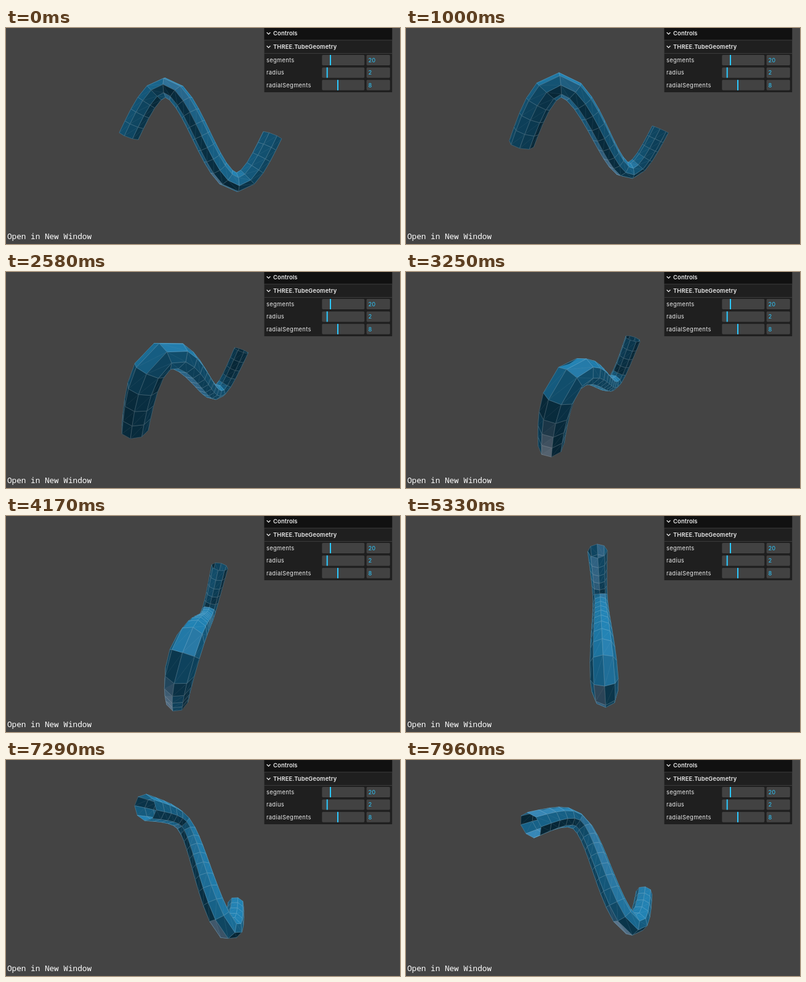
An HTML page with a canvas that plays this animation: 640x353 px, repeating every 8000 ms.

```html
<!DOCTYPE html>
<html lang="en">
<head>
<meta charset="utf-8">
<title>Tube geometry</title>
<style>
  html, body { margin: 0; width: 100%; height: 100%; overflow: hidden; background: #444; }
  canvas, svg { position: absolute; left: 0; top: 0; width: 640px; height: 353px; }
  text { font-family: Inter, Roboto, sans-serif; font-size: 9.35px; fill: #ebebeb; }
  .label { letter-spacing: .3px; }
  .title { font-weight: 600; letter-spacing: .16px; }
  .value { fill: #2cc9ff; }
  .link { font-family: "Noto Sans Mono", "DejaVu Sans Mono", monospace; font-size: 12.7px; fill: #fff; }
  .widget { fill: #424242; }
  .fill { fill: #2cc9ff; }
  .chevron { fill: none; stroke: #ebebeb; stroke-width: 1.3; }
</style>
</head>
<body>
<canvas id="scene" width="640" height="353"></canvas>
<svg id="panel" viewBox="0 0 640 353">
  <rect x="419.6" y="0" width="207.6" height="105" fill="#1f1f1f"/>
  <rect x="419.6" y="0" width="207.6" height="19.4" fill="#111"/>
  <path d="M419.6 19.9h207.6M419.6 41.5h207.6" stroke="#424242" stroke-width=".85"/>
  <path class="chevron" d="M423.6 7.2l2.9 2.9 2.9-2.9M423.6 29.2l2.9 2.9 2.9-2.9"/>
  <text class="title" x="434" y="11.9">Controls</text>
  <text class="title" x="434" y="34.1">THREE.TubeGeometry</text>
  <text class="link" x="2" y="345">Open in New Window</text>
</svg>
<script>
const SEGMENTS = 20, RADIUS = 2, SIDES = 8;
const CENTER_X = 317.5, CENTER_Y = 175.8, FOCAL = 231.6, CAMERA_Z = 30;
const LOOP = 8000, STEP = 1000 / 24, SPIN = 0.3, START_ANGLE = 0.025;

const sub = (a, b) => a.map((v, i) => v - b[i]);
const add = (a, b) => a.map((v, i) => v + b[i]);
const dot = (a, b) => a[0] * b[0] + a[1] * b[1] + a[2] * b[2];
const cross = (a, b) => [
  a[1] * b[2] - a[2] * b[1],
  a[2] * b[0] - a[0] * b[2],
  a[0] * b[1] - a[1] * b[0]
];
const unit = a => {
  const length = Math.hypot(...a) || 1;
  return a.map(v => v / length);
};

// Control panel rows: label, value, slider position
const panel = document.getElementById('panel');
[['segments', 20, 526], ['radius', 2, 520.7], ['radialSegments', 8, 538]].forEach(([label, value, x], row) => {
  const y = 44 + row * 20.4;
  panel.insertAdjacentHTML('beforeend', `
    <text class="label" x="423" y="${y + 11.9}">${label}</text>
    <rect class="widget" x="513.3" y="${y}" width="69" height="17" rx="1.7"/>
    <rect class="fill" x="${x}" y="${y}" width="2" height="17"/>
    <rect class="widget" x="585.6" y="${y}" width="38.2" height="17" rx="1.7"/>
    <text class="value" x="588.6" y="${y + 11.9}">${value}</text>`);
});

// Sine curve, sampled at equal arc lengths
const curve = t => [30 * t - 15, 10 * Math.sin(2 * Math.PI * t), 0];
const DIVISIONS = 200;
const lengths = [0];
for (let i = 1; i <= DIVISIONS; i++) {
  const piece = sub(curve(i / DIVISIONS), curve((i - 1) / DIVISIONS));
  lengths.push(lengths[i - 1] + Math.hypot(...piece));
}
function atLength(u) {
  const goal = u * lengths[DIVISIONS];
  let i = 0;
  while (i < DIVISIONS - 1 && lengths[i + 1] < goal) i++;
  return (i + (goal - lengths[i]) / (lengths[i + 1] - lengths[i])) / DIVISIONS;
}

const vertices = [];
for (let j = 0; j <= SEGMENTS; j++) {
  const t = atLength(j / SEGMENTS);
  const [x, y] = curve(t);
  const [tx, ty] = unit([30, 20 * Math.PI * Math.cos(2 * Math.PI * t), 0]);
  for (let i = 0; i < SIDES; i++) {
    const angle = i / SIDES * 2 * Math.PI;
    const side = RADIUS * Math.sin(angle);
    vertices.push([x - ty * side, y + tx * side, RADIUS * Math.cos(angle)]);
  }
}
// Each triangle ends with its diagonal: last corner back to the first
const triangles = [];
for (let j = 0; j < SEGMENTS; j++) {
  for (let i = 0; i < SIDES; i++) {
    const next = (i + 1) % SIDES;
    const a = j * SIDES + i, b = a + SIDES, d = j * SIDES + next, c = d + SIDES;
    triangles.push([d, a, b], [b, c, d]);
  }
}

// Phong shading in linear light
const toLinear = v => v <= 10 ? v / 255 / 12.92 : ((v / 255 + 0.055) / 1.055) ** 2.4;
const toSrgb = v => {
  v = Math.min(1, v);
  return Math.round(255 * (v <= 0.0031308 ? 12.92 * v : 1.055 * v ** (1 / 2.4) - 0.055));
};
const DIFFUSE = [0x15, 0x62, 0x89].map(toLinear);
const EMISSIVE = [0x07, 0x25, 0x34].map(toLinear);
const SPECULAR = toLinear(0x11), SHININESS = 30, INTENSITY = 3;
const LIGHTS = [[0, 1, 0], [1, 2, 1], [-1, -2, -1]].map(unit);

function shade(normal, view) {
  let diffuse = 0, gloss = 0;
  for (const light of LIGHTS) {
    const irradiance = INTENSITY * Math.max(0, dot(normal, light));
    if (!irradiance) continue;
    diffuse += irradiance / Math.PI;
    const half = unit(add(light, view));
    const fresnel = SPECULAR + (1 - SPECULAR) * (1 - Math.max(0, dot(view, half))) ** 5;
    const lobe = (SHININESS / 2 + 1) / Math.PI * Math.max(0, dot(normal, half)) ** SHININESS;
    gloss += irradiance * fresnel * lobe / 4;
  }
  const rgb = DIFFUSE.map((v, i) => toSrgb(v * diffuse + EMISSIVE[i] + gloss));
  return `rgb(${rgb})`;
}

const ctx = document.getElementById('scene').getContext('2d');
ctx.lineJoin = 'round';

function trace(points) {
  ctx.beginPath();
  points.forEach(([x, y]) => ctx.lineTo(x, y));
}
function stroke(style, width) {
  ctx.strokeStyle = style;
  ctx.lineWidth = width;
  ctx.stroke();
}

function draw(angle) {
  const c = Math.cos(angle), s = Math.sin(angle);
  const points = vertices.map(([x, y, z]) => {
    const turned = z * c - x * s;
    return [x * c + z * s, y * c - turned * s, y * s + turned * c];
  });
  const screen = points.map(([x, y, z]) => {
    const scale = FOCAL / (CAMERA_Z - z);
    return [CENTER_X + x * scale, CENTER_Y - y * scale];
  });
  const faces = triangles.map(corners => {
    const [p, q, r] = corners.map(i => points[i]);
    const middle = add(add(p, q), r).map(v => v / 3);
    const toCamera = sub([0, 0, CAMERA_Z], middle);
    const view = unit(toCamera);
    let normal = unit(cross(sub(q, p), sub(r, p)));
    if (dot(normal, view) < 0) normal = normal.map(v => -v);
    return { corners, color: shade(normal, view), depth: Math.hypot(...toCamera) };
  }).sort((a, b) => b.depth - a.depth);

  ctx.fillStyle = '#444';
  ctx.fillRect(0, 0, 640, 353);
  for (const { corners, color } of faces) {
    const shape = corners.map(i => screen[i]);
    trace(shape);
    ctx.closePath();
    ctx.fillStyle = color;
    ctx.fill();
    stroke(color, 0.5);
    trace(shape);
    stroke('rgba(255, 255, 255, 0.22)', 0.75);
    trace([shape[2], shape[0]]);
    stroke('rgba(255, 255, 255, 0.07)', 0.75);
  }
}

function tick() {
  const time = performance.now() % LOOP;
  const step = Math.min(191, Math.floor((time + 5) / STEP));
  draw(START_ANGLE + SPIN * step * STEP / 1000);
  requestAnimationFrame(tick);
}
tick();
</script>
</body>
</html>
```
